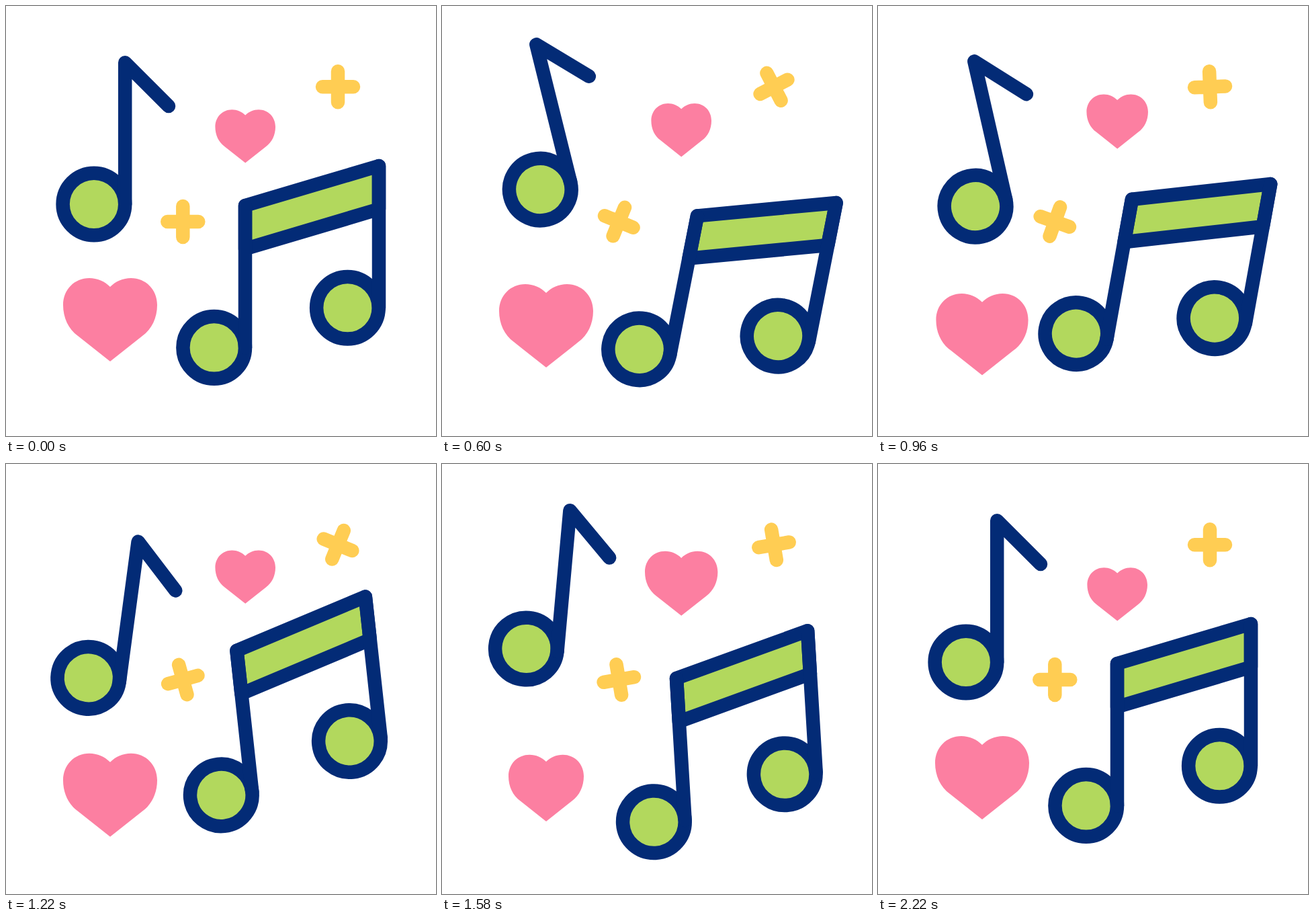
An HTML page that plays this animation: 640 px wide and 640 px high, repeating every 2400 ms.

```html
<!DOCTYPE html>
<html lang="en">
<head>
<meta charset="utf-8">
<title>Music notes</title>
<style>
  html, body { margin: 0; width: 100%; height: 100%; overflow: hidden; background: #fff; }
  svg { display: block; width: 100%; height: 100%; }
  .note { fill: none; stroke: #032b76; stroke-width: 20.5; stroke-linecap: round; stroke-linejoin: round; }
  .note .green { fill: #b2d85d; }
  .heart { fill: #fc7fa1; }
  .plus { fill: none; stroke: #ffcd53; stroke-width: 20.5; stroke-linecap: round; }
</style>
</head>
<body>
<svg viewBox="0 0 640 640">
  <defs>
    <path id="heart" d="M0-38C-8-46-19-51-31-51C-53-51-70-34-70-11C-70 8-62 25-48 35L0 73L48 35C62 25 70 8 70-11C70-34 53-51 31-51C19-51 8-46 0-38Z"/>
    <path id="plus" d="M0-23V23M-23 0H23"/>
  </defs>
  <use id="bigHeart" class="heart" href="#heart"/>
  <use id="smallHeart" class="heart" href="#heart"/>
  <use id="topPlus" class="plus" href="#plus"/>
  <use id="midPlus" class="plus" href="#plus"/>
  <g id="single" class="note">
    <circle class="green" cx="130.9" cy="295" r="46.3"/>
    <path d="M177.2 295V84.2L242 149"/>
  </g>
  <g id="beamed" class="note">
    <circle class="green" cx="309.7" cy="508.4" r="46.3"/>
    <circle class="green" cx="508.4" cy="449.2" r="46.3"/>
    <path class="green" d="M356 297L555 238V302.3L356 361.5Z"/>
    <path d="M356 508.4V297M555 449.2V238"/>
  </g>
</svg>
<script>
const LOOP = 2400;
const $ = id => document.getElementById(id);
const smooth = u => u * u * (3 - 2 * u);

// Eased interpolation through values at the given times
function track(times, values, t) {
  if (t <= times[0]) return values[0];
  for (let i = 1; i < times.length; i++) {
    if (t < times[i]) {
      const u = (t - times[i - 1]) / (times[i] - times[i - 1]);
      return values[i - 1] + (values[i] - values[i - 1]) * smooth(u);
    }
  }
  return values[values.length - 1];
}

const SWING = [200, 800, 1400, 1800, 2205];
const BOB = [200, 700, 1200, 1700, 2205];
const DRIFT = [200, 1200, 2205];
const BEAT = [200, 400, 600, 800, 1000, 1400, 1600, 1800, 2000, 2205];

const set = (id, transform) => $(id).setAttribute('transform', transform);

function draw(t) {
  const swing = (...values) => track(SWING, values, t);
  const bob = track(BOB, [0, 26, -26, 26, 0], t);
  const drift = track(DRIFT, [0, 25.8, 0], t);
  const beat = track(BEAT, [0, 1, 0, 1, 0, 0, 1, 0, 1, 0], t);

  set('single', `translate(0 ${-bob}) rotate(${swing(0, -18.8, 14.8, -7.7, 0)} 144.5 233)`);
  set('beamed', `translate(0 ${bob}) rotate(${swing(0, 15, -12, 8, 0)} 409 416)`);
  set('topPlus', `translate(494 120.3) rotate(${track(BOB, [0, -30.5, 22.5, -15, 0], t)})`);
  set('midPlus', `translate(263.3 321) rotate(${swing(0, 30, -28, 15, 0)})`);
  set('bigHeart', `translate(155 ${456 + drift}) scale(${1 - 0.205 * beat})`);
  set('smallHeart', `translate(356.2 ${186.8 - drift}) scale(${0.64 * (1 + 0.215 * beat)})`);
}

const start = performance.now();
function tick() {
  draw((performance.now() - start) % LOOP);
  requestAnimationFrame(tick);
}
draw(0);
requestAnimationFrame(tick);
</script>
</body>
</html>
```
